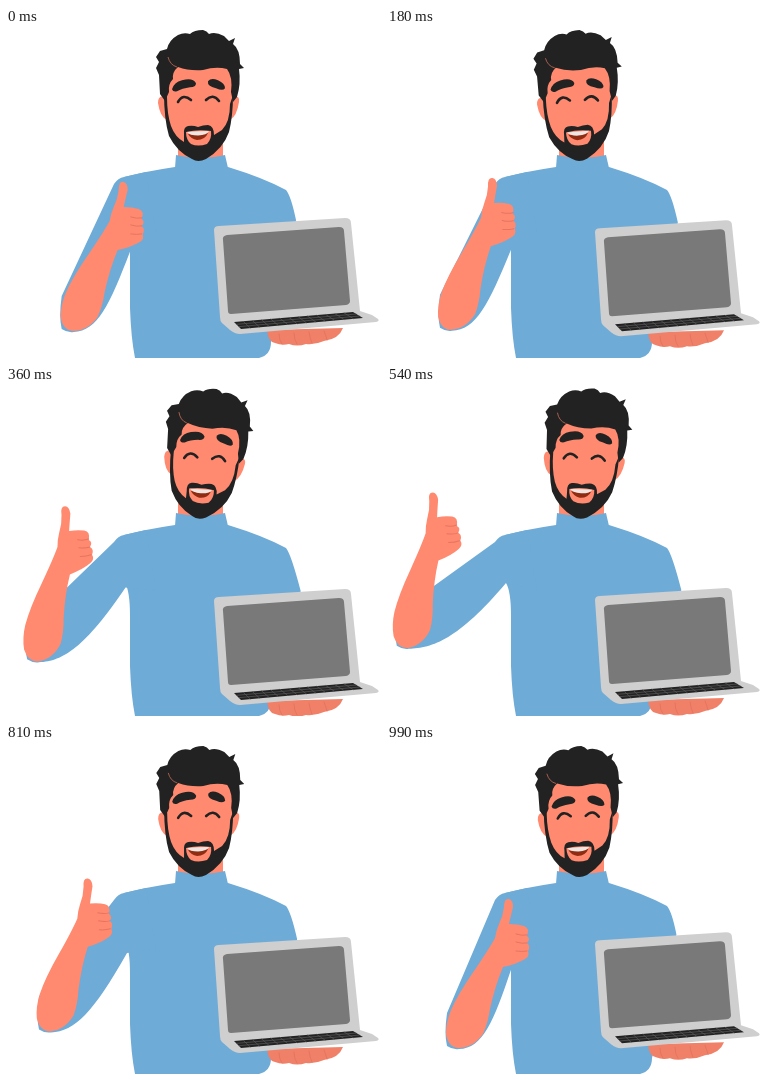
Write an HTML page that moves like this. It is 375 by 330 pixels and loops after 1.08 s.

```html
<!DOCTYPE html>
<html lang="en">
<head>
<meta charset="utf-8">
<title>Thumbs up with laptop</title>
<style>
html, body { margin: 0; width: 100%; height: 100%; overflow: hidden; background: #fff; }
svg { display: block; width: 375px; height: 330px; }
.blue { fill: #6eabd7; }
.skin { fill: #ff8a70; }
.ink { fill: #222; }
.crease { fill: none; stroke: #e67560; stroke-width: 1; stroke-linecap: round; }
</style>
</head>
<body>
<svg viewBox="0 0 375 330">
  <path id="torso" class="blue"/>
  <path id="sleeve" class="blue"/>
  <path class="skin" d="M172 100H217V128Q195 134 172 128Z"/>
  <path class="blue" d="M170 127Q195 133 219 127L222 140L169 140Z"/>

  <g id="head">
    <path class="skin" d="M160 69Q152 66 152 75Q154 89 161 92ZM226 70Q234 66 233 74Q231 88 224 92Z"/>
    <path class="skin" d="M157 40Q190 20 228 40L226 84Q222 108 212 119Q192 133 174 119Q162 106 159 84Z"/>
    <path class="ink" d="M159 73L154 66L153 47L150 40L153 34L150 29L154 23L161 21Q163 12 172 7Q178 4 184 6Q188 2 197 2Q201 3 203 6Q209 3 218 8L223 13L229 10L227 16Q234 21 234 36L238 40L233 41Q235 56 231 69L227 74L225 64Q227 49 221 41Q210 38 197 42Q183 43 172 39Q166 44 167 51Q162 56 163 64Z"/>
    <path class="ink" d="M158 65Q158 91 163 108Q171 124 186 131Q192 135 200 131Q217 121 223 104Q227 88 227 67L224 76Q224 94 216 102L208 107Q208 98 202 97Q197 97 192 99Q187 97 182 98Q177 99 178 107V114Q169 109 165 98Q161 86 161 69Z"/>
    <path class="skin" d="M180 104Q192 101 205 103Q206 111 201 116Q192 119 185 116Q180 112 180 104Z"/>
    <path fill="#8f2c12" d="M182 106Q192 108 202 105Q199 112 191 112Q185 111 182 106Z"/>
    <path fill="#eee6e2" d="M181 104Q192 103 203 103Q201 107 192 107.500Q184 107.500 181 104Z"/>
    <path id="brows" class="ink" d="M166 62Q168 55 176 53Q187 50 190 56Q190 60 184 60Q176 61 171 64Q167 65 166 62ZM202 54Q205 50 212 53Q219 56 219 61Q217 64 210 61Q201 59 202 54Z"/>
    <path fill="none" stroke="#222" stroke-width="2.6" stroke-linecap="round" d="M172 74Q177 65 185 72M200 72Q207 65 213 73"/>
    <path fill="none" stroke="#c46b58" stroke-width=".8" d="M162 29Q164 37 171 39"/>
  </g>

  <g id="laptop">
    <path fill="#f08068" d="M261 302Q262 314 269 315Q276 318 283 316Q291 319 300 316Q309 317 318 313Q333 311 337 300Z"/>
    <path class="crease" d="M273 306Q273 312 276 316M288 305Q288 312 291 316M303 304Q304 311 306 315M318 303Q320 308 321 312"/>
    <path fill="#cfcfcf" d="M208 202Q208 198 213 198L339 190Q345 190 345 195L354 283L366 287L372 291Q374 293 370 294L234 306Q229 306 224 302L216 295Q214 293 214 289Z"/>
    <path fill="#797979" d="M217 212Q216 208 221 207L333 199Q338 199 338 203L344 273Q344 276 340 277L225 286Q222 286 222 283Z"/>
    <path class="ink" d="M228 294L347 284L357 290L235 301Z"/>
    <path id="keys" fill="none" stroke="#5b5b5b" stroke-width=".7"/>
  </g>

  <g id="forearm">
    <path class="skin" d="M118 153Q113 152 113 161Q112 170 108 178Q105 185 104 192Q98 203 83 225Q67 248 60 264Q55 276 55 288Q57 301 67 302Q82 302 92 288Q97 277 99 263Q104 240 112 221Q126 218 134 213Q139 210 137 205Q140 200 136 197Q140 193 136 190Q139 182 133 180Q127 178 118 178Q120 169 122 161Q122 154 118 153Z"/>
    <path class="crease" d="M125 188Q131 190 136 189M125 196Q131 198 136 197M125 205Q131 206 136 205"/>
  </g>
</svg>
<script>
const STEP = 90, COUNT = 12;
// key points as [step, value], eased in between
const SWING = [[0, 0.08], [2, 0.13], [4, 0.72], [7, 1], [11, 0]];
const WRIST = [[0, 0], [2, -3.6], [4, -9], [7, -10], [11, 0]];
const NOD = [[0, 0], [2, -2], [4, 6], [11, -1.2]];
const DROP = [[0, 0], [2, 2.3], [4, 13], [6, 12], [11, -1.7]];

const set = (id, name, value) => document.getElementById(id).setAttribute(name, value);

function ease(keys, n) {
  const i = Math.max(1, keys.findIndex(k => k[0] >= n));
  const [n0, v0] = keys[i - 1], [n1, v1] = keys[i];
  const u = (n - n0) / (n1 - n0);
  return v0 + (v1 - v0) * (1 - Math.cos(Math.PI * u)) / 2;
}

function keyLines() {
  let d = '';
  for (const k of [1 / 3, 2 / 3])
    d += `M${228 + 7 * k} ${294 + 7 * k}L${347 + 10 * k} ${284 + 6 * k}`;
  for (let k = 1 / 13; k < 0.99; k += 1 / 13)
    d += `M${228 + 119 * k} ${294 - 10 * k}L${235 + 122 * k} ${301 - 11 * k}`;
  return d;
}

// upper arm from the shoulder round the elbow (x, y) to the armpit
function sleevePath(x, y) {
  const low = (y - 262) / 40;
  const ax = 119 + 5 * low * low, ay = 197 + 8 * low + 17 * low * low;
  const cx = x + 17 + 0.33 * (ax - x), cy = y - 8 - 17 * low;
  return `M140 144L118 149Q112 150 108 156L${x - 12} ${y - 35}` +
    `Q${x - 15} ${y - 14} ${x - 12} ${y - 2}Q${x - 6} ${y + 2} ${x} ${y + 1}` +
    `C${x + 24} ${y} ${cx} ${cy} ${ax} ${ay}L150 205Z`;
}

function torsoPath(drop) {
  const x = 290 + 0.36 * drop, y = 192 + drop;
  return 'M169 139Q142 143 118 149L119 197Q124 205 124 230V280Q125 310 129 330' +
    `H253Q265 327 265 314L285 ${y + 40}L${x} ${y}Q285 168 280 162Q258 150 222 139Z`;
}

function pose(n) {
  const swing = ease(SWING, n), drop = ease(DROP, n);
  const x = 72 - 54 * swing, y = 304 - 47 * swing ** 1.5;
  set('sleeve', 'd', sleevePath(x, y));
  set('torso', 'd', torsoPath(drop));
  set('forearm', 'transform', `translate(${x - 68} ${y - 302}) rotate(${ease(WRIST, n)} 68 302)`);
  set('head', 'transform', `rotate(${ease(NOD, n)} 195 132)`);
  set('brows', 'transform', `translate(0 ${-6 * Math.sin(swing * Math.PI / 2)})`);
  set('laptop', 'transform', `translate(0 ${drop})`);
}

const start = performance.now();
function tick() {
  const t = Math.max(0, performance.now() - start);
  pose(Math.floor(t / STEP) % COUNT);
  requestAnimationFrame(tick);
}

set('keys', 'd', keyLines());
tick();
</script>
</body>
</html>
```
